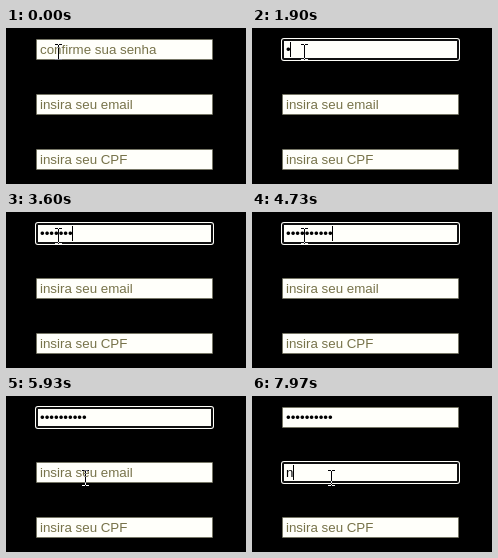
Animation of 240 by 156 pixels, one loop 8 s. Source, as an HTML page with a canvas:

```html
<!DOCTYPE html>
<html lang="pt-BR">
<head>
<meta charset="utf-8">
<title>Formulário</title>
<style>
  html, body { margin: 0; width: 100%; height: 100%; overflow: hidden; background: #000; }
  canvas { display: block; }
</style>
</head>
<body>
<canvas id="stage" width="240" height="156"></canvas>
<script>
const LOOP = 8000;
const PAPER = '#fffffa';
const HINT = '#77734a';
const BOX = { x: 30, w: 177, h: 21 };
const FIELDS = [
  { y: 11, hint: 'confirme sua senha', text: '••••••••••', focus: 400, blur: 5950,
    keys: [1700, 1910, 2120, ...Array.from({ length: 7 }, (_, i) => 2760 + i * 270)] },
  { y: 66, hint: 'insira seu email', text: 'n', focus: 5950, blur: LOOP, keys: [7750] },
  { y: 121, hint: 'insira seu CPF', text: '', focus: LOOP, blur: LOOP, keys: [] }
];
// Pointer stops: [start, end, x, y]
const MOVES = [
  [0, 0, 52, 24],
  [5000, 5460, 69, 88],
  [5560, 5860, 79, 82]
];

const ctx = document.getElementById('stage').getContext('2d');

function roundBox(x, y, w, h, r, color) {
  ctx.fillStyle = color;
  ctx.beginPath();
  ctx.roundRect(x, y, w, h, r);
  ctx.fill();
}

function drawField(field, t) {
  const { y } = field;
  const focused = t >= field.focus && t < field.blur;
  if (focused) {
    roundBox(BOX.x - 1, y - 1, BOX.w + 2, BOX.h + 2, 3, PAPER);
    roundBox(BOX.x, y, BOX.w, BOX.h, 2, '#101010');
    roundBox(BOX.x + 2, y + 2, BOX.w - 4, BOX.h - 4, 0, PAPER);
  } else {
    roundBox(BOX.x, y, BOX.w, BOX.h, 1, '#767666');
    roundBox(BOX.x + 1, y + 1, BOX.w - 2, BOX.h - 2, 0, PAPER);
  }

  const pressed = field.keys.filter(key => key <= t);
  const typed = field.text.slice(0, pressed.length);
  const left = BOX.x + 4;
  ctx.fillStyle = typed ? '#000' : HINT;
  ctx.fillText(typed || field.hint, left, y + 15);

  const lastInput = pressed.length ? pressed[pressed.length - 1] : field.focus;
  if (focused && (t - lastInput) % 1000 < 500) {
    ctx.fillStyle = '#000';
    ctx.fillRect(Math.floor(left + ctx.measureText(typed).width), y + 3, 1, 15);
  }
}

function pointerAt(t) {
  let [, , x, y] = MOVES[0];
  for (const [start, end, toX, toY] of MOVES.slice(1)) {
    const p = Math.min(1, Math.max(0, (t - start) / (end - start)));
    const ease = p * p * (3 - 2 * p);
    x += (toX - x) * ease;
    y += (toY - y) * ease;
  }
  return [Math.round(x), Math.round(y)];
}

function drawBeam(x, y) {
  // Inverts whatever lies beneath it
  ctx.globalCompositeOperation = 'difference';
  ctx.fillStyle = '#fff';
  ctx.fillRect(x, y - 7, 1, 14);
  for (const edge of [y - 8, y + 7]) {
    ctx.fillRect(x - 3, edge, 3, 1);
    ctx.fillRect(x + 1, edge, 3, 1);
  }
  ctx.globalCompositeOperation = 'source-over';
}

function drawArrow(x, y) {
  ctx.save();
  ctx.translate(x + 0.5, y + 0.5);
  const shape = new Path2D('M0 0V16L4 12.5L6.5 18L9 17L6.5 11.5H11.5Z');
  ctx.fillStyle = '#fff';
  ctx.fill(shape);
  ctx.strokeStyle = '#000';
  ctx.stroke(shape);
  ctx.restore();
}

function draw(now) {
  const t = now % LOOP;
  ctx.fillStyle = '#000';
  ctx.fillRect(0, 0, 240, 156);
  ctx.font = '13.333px "Liberation Sans", Arial, sans-serif';
  FIELDS.forEach(field => drawField(field, t));

  const [x, y] = pointerAt(t);
  const overField = FIELDS.some(f => y >= f.y && y < f.y + BOX.h);
  (overField ? drawBeam : drawArrow)(x, y);
  requestAnimationFrame(draw);
}
requestAnimationFrame(draw);
</script>
</body>
</html>
```
